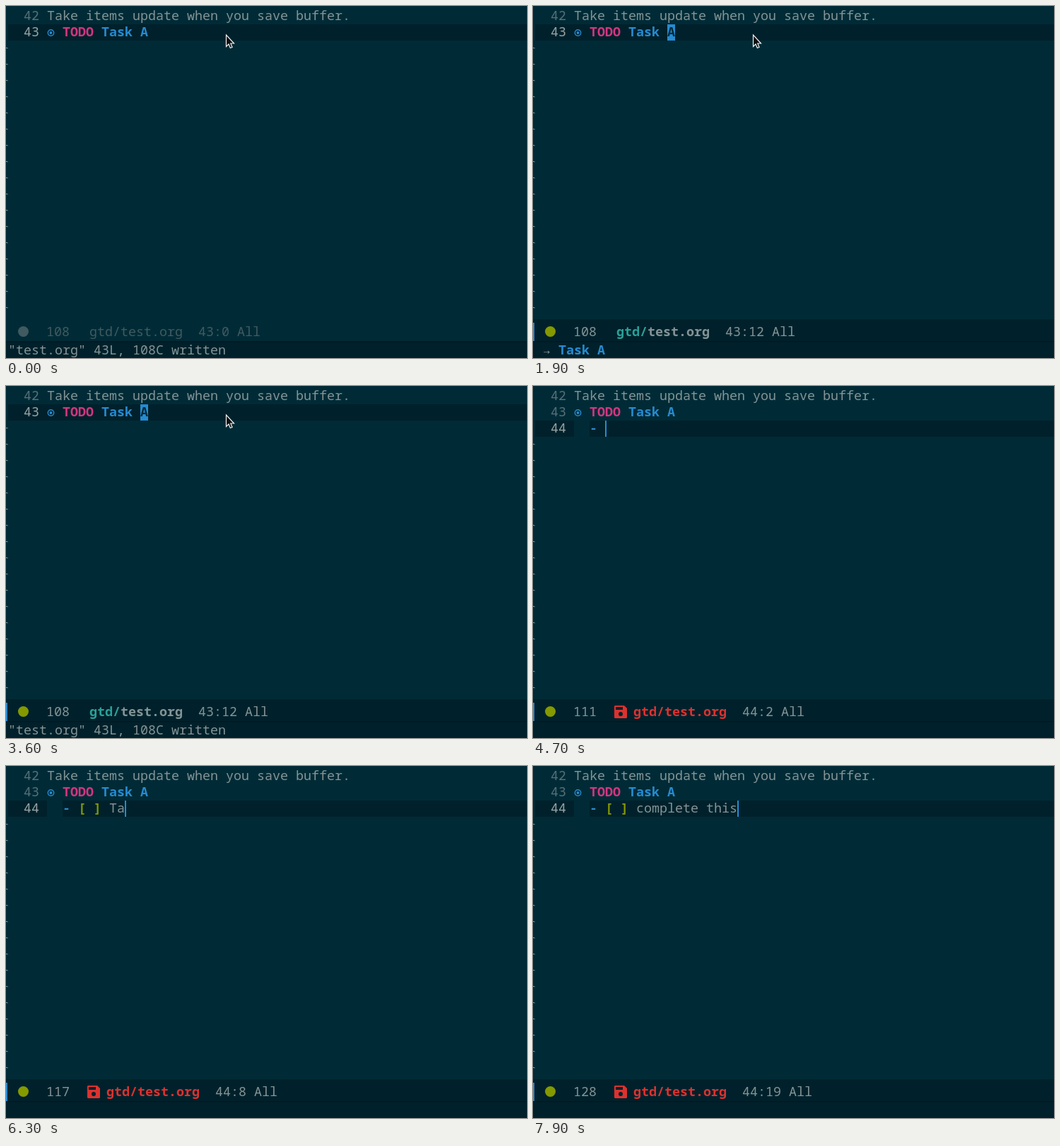
These frames come from a looping animation (737x499 px, 8000 ms). An HTML page with a canvas:

```html
<!DOCTYPE html>
<html lang="en">
<head>
<meta charset="utf-8">
<title>Org task editing</title>
<style>
  html, body { margin: 0; width: 100%; height: 100%; overflow: hidden; background: #002b36; }
  canvas { display: block; }
</style>
</head>
<body>
<canvas id="stage" width="737" height="499"></canvas>
<script>
const ctx = document.getElementById('stage').getContext('2d');
const W = 737, H = 499, CELL = 11, ROW = 23, LEFT = 58, LOOP = 8000;
const C = {
  bg: '#002b36', dark: '#00212b', line: '#00191f', region: '#073642',
  fg: '#839496', dim: '#56707a', bright: '#98a4a5', faint: '#405a61',
  blue: '#268bd2', pink: '#d33682', teal: '#2aa198', green: '#859900',
  yellow: '#b58900', red: '#dc322f'
};
const SAVED = '"test.org" 43L, 108C written';

// Each event changes only the listed parts of the editor state.
const events = [
  [0, { focus: false, mode: 'normal', row: 43, col: 0, dirty: false, item: null, echo: SAVED, mouse: true }],
  [600, { focus: true, mode: 'visual', col: 13, echo: '' }],
  [700, { mode: 'normal', col: 12 }],
  [1200, { echo: 'heading' }],
  [2100, { mode: 'insert', row: 44, item: '', dirty: true, echo: '-- INSERT --' }],
  [2800, { row: 43, col: 13, item: null, echo: '' }],
  [3100, { mode: 'normal', col: 12 }],
  [3300, { echo: ':' }],
  [3400, { echo: ':w' }],
  [3600, { echo: SAVED, dirty: false }],
  [4000, { mode: 'insert', row: 44, item: '', dirty: true, echo: '' }],
  [4100, { echo: '-- INSERT --' }],
  [4700, { item: '- ', echo: '', mouse: false }]
];

// Types one list of successive lengths of a text, one step per 100 ms.
function type(start, text, lengths) {
  lengths.forEach((n, i) => events.push([start + i * 100, { item: text.slice(0, n) }]));
}
type(4900, '- [ ] ', [3, 4, 5, 6]);
type(5800, '- [ ] Tas', [7, 8, 9]);
type(6300, '- [ ] Ta', [8]);
type(6700, '- [ ] complete', [6, 7, 8, 9, 11, 12, 14]);
type(7500, '- [ ] complete this', [15, 16, 17, 18, 19]);

function stateAt(t) {
  const s = {};
  for (const [time, change] of events) if (time <= t) Object.assign(s, change);
  return s;
}

function rect(x, y, w, h, color) {
  ctx.fillStyle = color;
  ctx.fillRect(x, y, w, h);
}

function text(str, x, y, color, bold) {
  ctx.font = (bold ? 'bold ' : '') + '18.333px "Noto Sans Mono", "DejaVu Sans Mono", monospace';
  ctx.fillStyle = color;
  ctx.fillText(str, x, y);
}

function disc(x, y, r, color) {
  ctx.beginPath();
  ctx.arc(x, y, r, 0, Math.PI * 2);
  ctx.fillStyle = color;
  ctx.fill();
}

function polygon(points) {
  ctx.beginPath();
  points.forEach(([x, y]) => ctx.lineTo(x, y));
  ctx.closePath();
}

function drawHeading(s) {
  const top = 26, base = 43, current = s.row === 43;
  if (current) {
    rect(3, top, s.mode === 'visual' ? LEFT - 3 : W, ROW, C.dark);
    if (s.mode === 'visual') rect(201, top, W, ROW, C.region);
  }
  text('43', 25, base, current ? C.bright : C.dim);
  ctx.beginPath();
  ctx.arc(63.5, 38, 4.2, 0, Math.PI * 2);
  ctx.strokeStyle = C.blue;
  ctx.lineWidth = 1.4;
  ctx.stroke();
  disc(63.5, 38, 1.9, C.blue);
  text('TODO', 80, base, C.pink, true);
  text('Task A', 135, base, C.blue, true);
  if (!current || !s.focus) return;

  const x = LEFT + (s.col + (s.mode === 'normal' ? 0 : 0)) * CELL;
  if (s.mode === 'normal') {
    rect(x, top, CELL, ROW, C.blue);
    text('A', x, base, C.bg, true);
  } else if (s.mode === 'visual') {
    ctx.lineWidth = 1;
    ctx.strokeRect(x + .5, top + .5, CELL - 1, ROW - 1);
  } else {
    rect(x, top, 2, ROW, C.blue);
  }
}

function drawItem(item) {
  const top = 49, base = 66, x = 80;
  rect(3, top, LEFT - 3, ROW, C.dark);
  rect(x, top, W, ROW, C.dark);
  text('44', 25, base, C.bright);
  text(item.slice(0, 1), x, base, C.blue, true);
  text(item.slice(2, 5), x + 2 * CELL, base, C.green, true);
  text(item.slice(6), x + 6 * CELL, base, C.fg);
  rect(x + item.length * CELL, top, 2, ROW, C.blue);
}

function drawFloppy(x, y, bg) {
  ctx.fillStyle = C.red;
  polygon([[x + 1, y], [x + 14, y], [x + 18, y + 4], [x + 18, y + 17],
    [x + 17, y + 18], [x + 1, y + 18], [x, y + 17], [x, y + 1]]);
  ctx.fill();
  rect(x + 2, y + 2, 10, 4, bg);
  disc(x + 9, y + 12, 3, bg);
}

function drawStatus(s) {
  const base = 468, bg = s.focus ? C.dark : C.bg;
  const fg = s.focus ? C.fg : C.faint;
  rect(0, 444, W, 32, bg);
  if (s.focus) rect(0, 449, 2, 27, C.blue);
  disc(24.5, 461.5, 7.5, !s.focus ? C.faint : s.mode === 'visual' ? C.yellow : C.green);

  const inItem = s.row === 44;
  const col = inItem ? s.item.length : s.col;
  const size = 108 + (inItem ? 1 + s.item.length : 0);
  text(String(size), 57, base, fg);
  if (s.dirty) {
    drawFloppy(115, 453, bg);
    text('gtd/test.org', 142, base, C.red, true);
  } else {
    text('gtd/', 118, base, s.focus ? C.teal : fg, s.focus);
    text('test.org', 162, base, fg, s.focus);
  }
  const x = s.dirty ? 296 : 272;
  const place = s.row + ':' + col + ' All';
  text(place, x, base, fg);
  if (s.mode === 'visual') text('1C', x + (place.length + 1) * CELL, base, C.blue);
}

function drawEcho(echo) {
  rect(0, 476, W, 23, C.dark);
  rect(0, 475, W, 1.5, C.line);
  if (echo === 'heading') {
    text('→', 14, 494, C.fg);
    text('Task A', 36, 494, C.blue, true);
  } else {
    text(echo, 3, 494, C.fg);
  }
}

function drawMouse() {
  polygon([[311.5, 41], [311.5, 57.5], [315, 54], [317.3, 59.5],
    [320, 58.5], [317.8, 53], [322.5, 53]]);
  ctx.fillStyle = '#0b0f10';
  ctx.fill();
  ctx.strokeStyle = '#f4f4f4';
  ctx.lineWidth = 1.2;
  ctx.stroke();
}

function draw(t) {
  const s = stateAt(t);
  rect(0, 0, W, H, C.bg);
  text('42', 25, 20, C.dim);
  text('Take items update when you save buffer.', LEFT, 20, C.fg);
  drawHeading(s);
  if (s.item !== null) drawItem(s.item);
  for (let y = s.item === null ? 59 : 82; y <= 428; y += ROW) {
    rect(0, y, 2, 1, C.fg);
    rect(2, y + .5, 1, 1, C.dim);
  }
  drawStatus(s);
  drawEcho(s.echo);
  if (s.mouse) drawMouse();
}

const start = performance.now();
function tick() {
  draw((performance.now() - start) % LOOP);
  requestAnimationFrame(tick);
}
tick();
</script>
</body>
</html>
```
